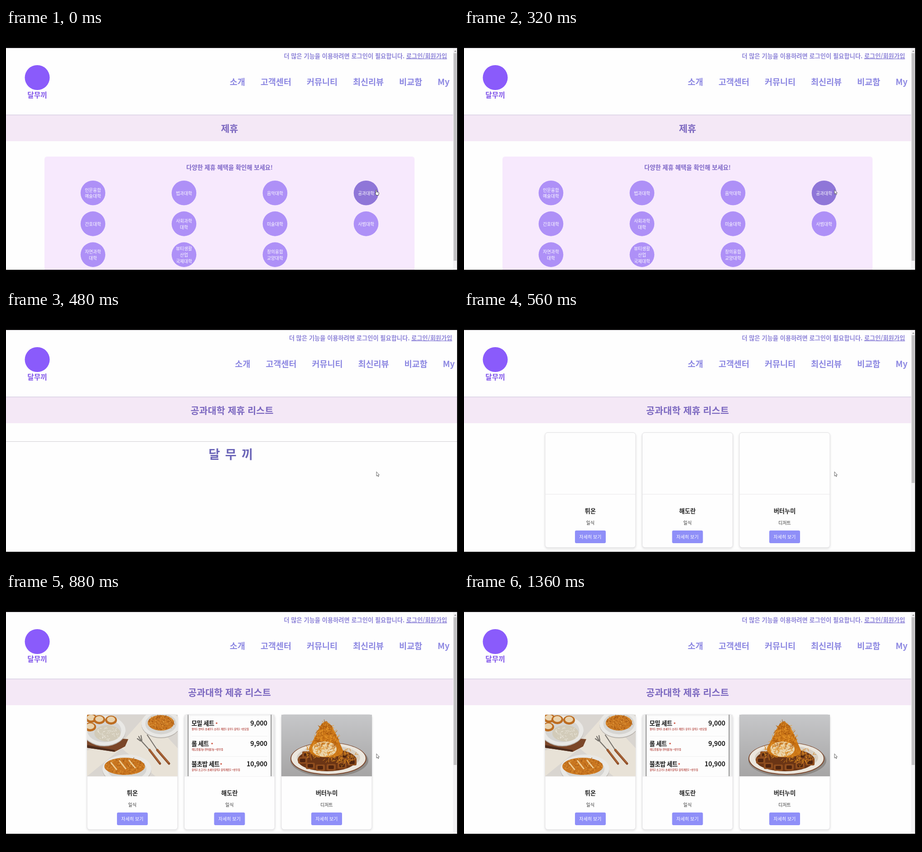
Recreate the animation shown at these times as an HTML page. Size 998 by 561 pixels, loop 1.44 s.

```html
<!DOCTYPE html>
<html lang="ko">
<head>
<meta charset="utf-8">
<style>
  html, body { margin: 0; width: 100%; height: 100%; overflow: hidden; background: #000; }
  svg { display: block; }
  text { font-family: "Noto Sans CJK KR", "Noto Sans CJK", "Noto Sans KR", sans-serif; }
</style>
</head>
<body>
<svg id="stage" width="998" height="561" viewBox="0 0 998 561"></svg>
<script>
const LOOP = 1440;
const stage = document.getElementById('stage');

// y is the visual middle of the line of text
const text = (x, y, str, size, fill, extra = '') =>
  `<text x="${x}" y="${y + size * 0.38}" font-size="${size}" fill="${fill}" ${extra}>${str}</text>`;
const BOLD = 'font-weight="700"', MID = 'text-anchor="middle"', END = 'text-anchor="end"';
const rect = (x, y, w, h, fill, extra = '') =>
  `<rect x="${x}" y="${y}" width="${w}" height="${h}" fill="${fill}" ${extra}/>`;
const oval = (x, y, rx, ry, fill, extra = '') =>
  `<ellipse cx="${x}" cy="${y}" rx="${rx}" ry="${ry}" fill="${fill}" ${extra}/>`;
const path = (d, fill, extra = '') => `<path d="${d}" fill="${fill}" ${extra}/>`;
const line = (d, stroke, width) => path(d, 'none', `stroke="${stroke}" stroke-width="${width}" stroke-linecap="round"`);
const group = (id, body) => `<g id="${id}">${body}</g>`;

let seed = 7;
const random = () => (seed = (seed * 16807) % 2147483647) / 2147483647;

// short random strokes scattered over an oval; narrow > 0 tapers it upwards
function crumbs(x, y, rx, ry, count, length, color, narrow = 0) {
  let d = '';
  for (let i = 0; i < count; i++) {
    const a = random() * 2 * Math.PI, r = Math.sqrt(random());
    const v = r * Math.sin(a);
    const px = x + r * Math.cos(a) * rx * (1 + narrow * v), py = y + v * ry;
    const turn = random() * 2 * Math.PI;
    d += `M${px.toFixed(1)} ${py.toFixed(1)}l${(Math.cos(turn) * length).toFixed(1)} ${(Math.sin(turn) * length).toFixed(1)}`;
  }
  return line(d, color, 1);
}

function header() {
  const menu = [[494, '소개'], [562, '고객센터'], [664, '커뮤니티'], [766, '최신리뷰'], [868, '비교함'], [953, 'My']];
  return rect(0, 44, 996, 490, '#fefefe') + rect(0, 44, 996, 1, '#d8d6da') +
    oval(69, 109.5, 27.5, 27.5, '#8a5bfb') +
    text(69, 147.5, '달무끼', 15.8, '#8055ea', `${BOLD} ${MID}`) +
    group('nav',
      text(613.5, 61.5, '더 많은 기능을 이용하려면 로그인이 필요합니다.', 13.25, '#8d83d8', BOLD) +
      text(883.7, 61.5, '로그인/회원가입', 13.2, '#8d83d8', `${BOLD} text-decoration="underline"`) +
      menu.map(([x, label]) => text(x, 119.3, label, 18.5, '#8d88e2', BOLD)).join('')) +
    rect(0, 192, 996, 58, '#f4e8f6') + rect(0, 191.5, 996, 1, '#c9c0dc');
}

const title = (x, str) => text(x, 222.3, str, 20.7, '#7c68c0', `${BOLD} ${MID}`);

const scrollbar = bottom =>
  rect(987, 45, 9, 489, '#f3f2f4') + path('M989.5 52.5l2.5-3 2.5 3z', '#8a8a8a') +
  rect(988.3, 55.5, 6.7, bottom - 55.5, '#c1c0c2');

function landing() {
  const colleges = [
    ['인문융합/예술대학', '법과대학', '음악대학', '공과대학'],
    ['간호대학', '사회과학/대학', '미술대학', '사범대학'],
    ['자연과학/대학', '뷰티생활/산업/국제대학', '창의융합/교양대학']
  ];
  let out = title(493.5, '제휴') +
    path('M85 534V290q0-6 6-6H896q6 0 6 6V534z', '#f7e9fd') +
    text(493.5, 308, '다양한 제휴 혜택을 확인해 보세요!', 13.3, '#7f68c8', `${BOLD} ${MID}`);
  colleges.forEach((row, j) => row.forEach((name, i) => {
    const x = 192 + i * 201, y = 364.2 + j * 68.2, lines = name.split('/');
    out += oval(x, y, 27.3, 27.3, name === '공과대학' ? '#8f76d8' : '#ae90f7');
    lines.forEach((s, k) => {
      out += text(x, y + 0.7 + (k - (lines.length - 1) / 2) * 13.7, s, 9.7, '#fff', MID);
    });
  }));
  return out + scrollbar(514);
}

const loading = () => title(499, '공과대학 제휴 리스트') + rect(0, 290, 996, 1, '#cfcdd2') +
  ['달', '무', '끼'].map((s, i) => text(460 + i * 36.3, 318.5, s, 27.5, '#6c66b8', `${BOLD} ${MID}`)).join('');

function cards() {
  const shops = [['튀온', '일식'], ['해도란', '일식'], ['버터누미', '디저트']];
  return title(493.5, '공과대학 제휴 리스트') + shops.map(([name, kind], i) => {
    const x = 179 + i * 214.5, mid = x + 100;
    return rect(x, 270.7, 200, 254, '#fefefe', 'rx="6" stroke="#dedde0" filter="url(#shadow)"') +
      rect(x, 406.5, 200, 1, '#e9e8ea') +
      text(mid, 444, name, 13.2, '#222', `${BOLD} ${MID}`) +
      text(mid, 470.5, kind, 10, '#333', `${MID} font-weight="500"`) +
      rect(mid - 34, 487, 68, 28, '#8f8ff8', 'rx="3"') +
      text(mid, 501, '자세히 보기', 10, '#fff', MID);
  }).join('') + scrollbar(382);
}

const photo = (x, body) =>
  `<svg x="${x}" y="271" width="200" height="136" viewBox="${x} 271 200 136">${body}</svg>`;

const plate = (x, y, rx, ry) =>
  oval(x, y + 2, rx, ry, '#b9b4ae') + oval(x, y, rx, ry, '#e9e8e5') + oval(x, y, rx * 0.8, ry * 0.78, '#d6d5d2');

const cutlet = (x, y, rx, ry) => oval(x, y, rx, ry, '#c8751f') +
  crumbs(x, y, rx, ry, 90, 3, '#e29a3c') + crumbs(x, y, rx, ry, 60, 3, '#9d5212');

function cutletPhoto() {
  const slices = [[188, 279], [206, 282], [232, 283], [186, 298]];
  return rect(179, 271, 200, 136, '#d9d5d0') +
    path('M179 350L262 325 310 271 379 345V407H330L255 345 179 407z', '#e8e2d7') +
    path('M179 318L270 325 263 341 240 353 179 344z', '#7b4628') + path('M179 338L240 349 240 353 179 344z', '#4d2c1c') +
    plate(217, 306, 47, 33) + oval(224, 312, 29, 18, '#d2cbb9') + crumbs(224, 312, 26, 15, 45, 3, '#eeeae0') +
    slices.map(([x, y]) => oval(x, y, 13, 10, '#bd6d21') + oval(x, y - 1.5, 9, 6.5, '#e9d3af')).join('') +
    plate(342, 291, 43, 30) + cutlet(342, 289, 29, 17) +
    plate(267, 391, 54, 32) + cutlet(262, 385, 45, 19) +
    line('M232 377l12 15M251 373l13 17M272 372l13 16', '#edc98e', 3) +
    line('M293 319l5 9 18 20M290 324l7 5M298 317l2 11M312 316l22 33', '#77736d', 2.2) +
    line('M317 349L340 379M334 349L360 379', '#8d4d27', 5) + line('M317 348L339 377M334 348L359 377', '#b86f3d', 1.5);
}

function menuPhoto() {
  const dishes = [
    ['모밀 세트', '9,000', '활어1 연어1 초새우1 소라1 계란1 유부1 갈릭1 +반모밀', 465],
    ['롤 세트', '9,900', '해도란롤3p 연어롤3p +반우동', 455],
    ['불초밥 세트', '10,900', '갈릭2 소고기1 초새우갈릭2 갈릭계란2 +반우동', 475]
  ];
  return rect(393.5, 271, 200, 136, '#ececec') + rect(402, 271, 183.5, 136, '#fdfdfd') +
    rect(401.5, 271, 1.2, 136, '#555') + rect(584.7, 271, 1.2, 136, '#555') + rect(402, 272.5, 183, 0.7, '#ddd') +
    dishes.map(([dish, price, parts, dot], i) => {
      const y = 289.8 + i * 45;
      return text(409.5, y, dish, 13.4, '#181818', `${BOLD} letter-spacing="-0.6"`) +
        text(577, y, price, 14, '#181818', `${BOLD} ${END}`) +
        text(410, y + 13.3, parts, 5.45, '#b8504a', BOLD) + oval(dot, y, 1.8, 1.8, '#cf5a48') +
        (i < 2 ? rect(410, y + 28.5, 167, 0.6, '#e6e6e6') : '');
    }).join('');
}

function wafflePhoto() {
  const blocks = [[655, 372], [672, 384], [694, 388], [718, 387], [742, 383], [764, 376], [748, 362], [664, 359]];
  return rect(608, 271, 200, 136, 'url(#wall)') +
    oval(714, 372, 86, 36, '#8d8985') + oval(712, 368, 84, 36, '#7d4a30') + oval(712, 367.5, 82, 34.5, '#ebe6dd') +
    oval(712, 366, 70, 27, '#d8cfc2') + oval(709, 371, 65, 25, '#6b3515') +
    blocks.map(([x, y]) => rect(x - 10, y - 7, 20, 14, '#8f4d1e', 'rx="3"') +
      rect(x - 6, y - 4, 12, 8, '#4f240f', 'rx="2"')).join('') +
    path('M705 286Q718 290 728 313L744 350Q746 365 708 365 668 365 669 345L686 313Q694 290 705 286z', '#ca7415') +
    oval(703, 347, 27, 17, '#ead3a8') +
    crumbs(706, 318, 26, 32, 190, 6, '#e8982c', 0.5) + crumbs(706, 318, 26, 32, 110, 6, '#a9570d', 0.5) +
    crumbs(738, 364, 36, 18, 110, 6, '#d98820') + crumbs(679, 354, 20, 12, 50, 6, '#d98820');
}

stage.innerHTML = `<defs>
    <linearGradient id="wall" x2="0" y2="1"><stop stop-color="#c6c7c9"/><stop offset="1" stop-color="#a6a5a5"/></linearGradient>
    <filter id="shadow"><feDropShadow dx="0" dy="2" stdDeviation="2" flood-opacity=".13"/></filter>
  </defs>` +
  header() + group('landing', landing()) + group('loading', loading()) + group('cards', cards()) +
  group('photos', photo(179, cutletPhoto()) + photo(393.5, menuPhoto()) + photo(608, wafflePhoto())) +
  group('hand', path('M816.6 358q1-1.3 2 0v4l4 1q1 .4.8 2l-1 4.5h-4.6l-2.6-4q-.4-1.4 1.4-.6z', '#fff', 'stroke="#333" stroke-width=".9"')) +
  group('arrow', path('M818 357.3v9.5l2.1-1.9 1.5 3.3 1.5-.7-1.5-3.2h2.7z', '#fff', 'stroke="#444" stroke-width=".8"')) +
  rect(0, 534, 998, 27, '#000') + rect(996, 0, 2, 561, '#000');

const part = Object.fromEntries([...stage.querySelectorAll('g[id]')].map(g => [g.id, g]));
const show = (id, on) => part[id].setAttribute('visibility', on ? 'visible' : 'hidden');

function draw() {
  const t = performance.now() % LOOP;
  const busy = t >= 400 && t < 560;
  show('landing', t < 400);
  show('loading', busy);
  show('cards', t >= 560);
  show('photos', t >= 640);
  show('hand', t < 320);
  show('arrow', t >= 320);
  part.nav.setAttribute('transform', `translate(${busy ? 11.4 : 0})`);
  requestAnimationFrame(draw);
}
draw();
</script>
</body>
</html>
```
